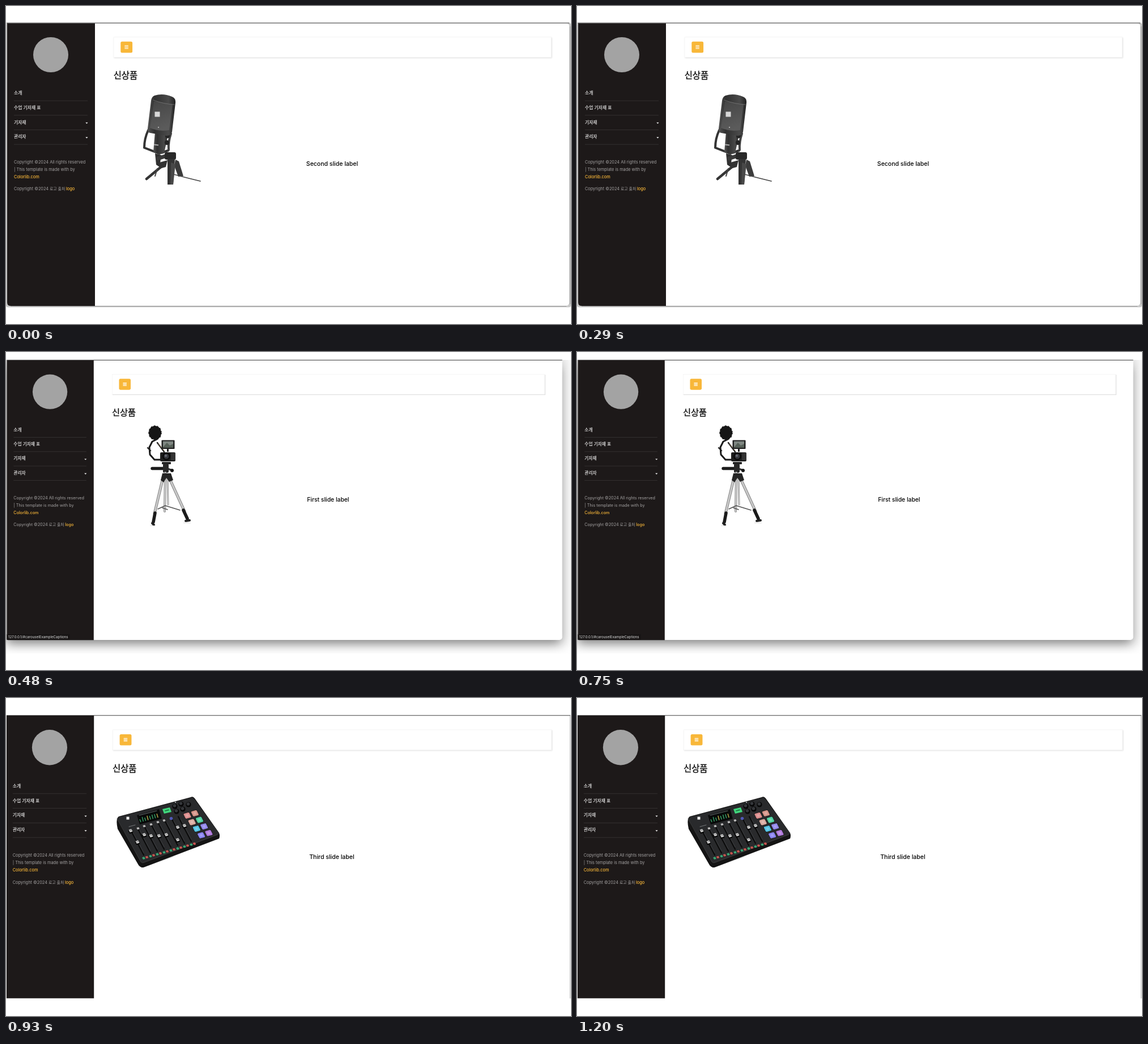
An HTML page for the animation above (1.38 s loop, 997 by 561 pixels).

```html
<!DOCTYPE html>
<html lang="ko">
<head>
<meta charset="utf-8">
<title>Product carousel</title>
<style>
  html, body { margin: 0; width: 100%; height: 100%; overflow: hidden; background: #fff; }
  svg { display: block; width: 997px; height: 561px; }
  text { font-family: Inter, "Noto Sans CJK KR", "Noto Sans CJK", sans-serif; }
  .ko { font-family: "Noto Sans CJK KR", "Noto Sans CJK", sans-serif; }
  .menu { font-size: 7.8px; fill: #f4f4f4; stroke: #f4f4f4; stroke-width: .15; }
  .note { font-size: 7.35px; fill: #a3a1a1; }
  .note .ko { font-size: 6.9px; }
  .note .link { fill: #f8b739; font-weight: 500; }
  .title { font-size: 15.4px; fill: #111; stroke: #111; stroke-width: .35; }
  .caption { font-size: 10.5px; font-weight: 500; fill: #000; text-anchor: middle; }
  .status { font-size: 6.2px; fill: #ddd; }
  .bar { fill: #fff; stroke: #f3f3f3; stroke-width: .7; filter: drop-shadow(1px 1px .8px rgba(0,0,0,.13)); }
</style>
</head>
<body>
<svg id="stage" viewBox="0 0 997 561">
  <defs>
    <filter id="soft" x="-10%" y="-10%" width="120%" height="125%"><feGaussianBlur stdDeviation="9"/></filter>
    <clipPath id="shot"><rect y="14" width="997" height="518"/></clipPath>
    <linearGradient id="metal">
      <stop offset="0" stop-color="#555"/><stop offset=".25" stop-color="#303030"/>
      <stop offset=".75" stop-color="#4a4a4a"/><stop offset="1" stop-color="#222"/>
    </linearGradient>
    <linearGradient id="grille" x2=".3" y2="1">
      <stop offset="0" stop-color="#454545"/><stop offset="1" stop-color="#5b5b5b"/>
    </linearGradient>
  </defs>
</svg>
<script>
const LOOP = 1380;
const SIDE = '#1d1919';

const path = (d, fill, extra = '') => `<path d="${d}" fill="${fill}" ${extra}/>`;
const line = (d, color, width, cap = 'round') =>
  `<path d="${d}" fill="none" stroke="${color}" stroke-width="${width}" stroke-linecap="${cap}" stroke-linejoin="round"/>`;
const rect = (x, y, w, h, fill, r = 0, extra = '') =>
  `<rect x="${x}" y="${y}" width="${w}" height="${h}" rx="${r}" fill="${fill}" ${extra}/>`;
const dot = (x, y, r, fill) => `<circle cx="${x}" cy="${y}" r="${r}" fill="${fill}"/>`;
const label = (x, y, cls, body) => `<text x="${x}" y="${y}" class="${cls}">${body}</text>`;

const sidebar = (x, y, right, bottom, r) =>
  path(`M${x} ${y}H${right}V${bottom}H${x + r}Q${x} ${bottom} ${x} ${bottom - r}Z`, SIDE);

function page(caption) {
  const items = ['소개', '수업 기자재 표', '기자재', '관리자'].map((name, i) => {
    const y = 156.3 + i * 25.65;
    const caret = i > 1 ? path(`M140.3 ${y - 2}h4.2l-2.1 2.2z`, '#fff') : '';
    return label(14, y, 'menu ko', name) + caret +
      rect(14, y + 10.4, 130, .9, 'rgba(255,255,255,.11)');
  }).join('');
  const bars = [69.6, 71.9, 74.2].map(y => rect(209.3, y, 6.6, 1.2, '#fff', .3)).join('');
  return dot(79, 86, 31, '#a3a3a3') + items +
    label(14, 277.6, 'note', 'Copyright ©2024 All rights reserved') +
    label(14, 290.7, 'note', '| This template is made with by') +
    label(14, 304, 'note', '<tspan class="link">Colorlib.com</tspan>') +
    label(14, 325.2, 'note', 'Copyright ©2024 <tspan class="ko" x="77">로고 출처</tspan>' +
      ' <tspan class="link" x="106">logo</tspan>') +
    rect(190, 55, 772, 35.5, '#fff', 0, 'class="bar"') +
    rect(202.3, 62.8, 20.8, 19.6, '#f8b739', 2.5) + bars +
    label(189.7, 128.2, 'title ko', '신상품') +
    label(575.5, 281.8, 'caption', caption);
}

function microphone() {
  return line('M251 219Q244 234 244 250L270 260L286 255', '#333', 4) +
    path('M263 222L286 226L279 260Q270 262 260 257Z', 'url(#metal)') +
    rect(261, 244, 8, 2, '#aaa', 0, 'transform="rotate(8 265 245)"') +
    line('M291 225Q286 240 287 254', '#444', 4) +
    dot(285, 229, 4.2, '#252525') + dot(284, 241, 4.2, '#252525') +
    path('M262 158Q277 153 293 160Q300 163 299 171L293 222Q291 229 283 229L255 224Q249 223 250 216L256 167Q257 160 262 158Z', 'url(#metal)') +
    path('M261 168L294 173L288 219Q270 222 254 215Z', 'url(#grille)') +
    line('M260 166Q278 173 297 174', '#777', .8) +
    rect(262.5, 186.5, 9, 9, '#d8d8d8') + dot(269, 214, 1, '#ccc') +
    path('M263 260L274 263L271 284L265 280Z', '#303030') +
    line('M268 269L284 264', '#3a3a3a', 7) +
    rect(280, 258, 20, 13, '#292929', 3) +
    line('M277 281L248 305', '#353535', 4.5) +
    path('M271 276L285 272L282 284L271 287Z', '#333') +
    path('M299 271L305 274L313 300L304 301L297 282Z', '#3b3b3b') +
    path('M285 270H298L295 315H285Z', '#333') +
    path('M291 276L299 279L295 315H290Z', '#484848') +
    line('M296 297Q314 302 343 309', '#444', 1.6) +
    line('M267 287L263 300', '#444', 2);
}

function cameraRig() {
  // Fluffy windshield: a circle with a wavering radius.
  const fur = Array.from({ length: 60 }, (_, i) => {
    const a = i * Math.PI / 30, r = 11.4 + Math.sin(i * 2.4) * Math.sin(i * 1.1 + 1);
    return `${(263 + r * Math.cos(a)).toFixed(1)} ${(142.5 + r * 1.1 * Math.sin(a)).toFixed(1)}`;
  }).join('L');
  const leg = (x1, y1, x2, y2, w) => line(`M${x1} ${y1}L${x2} ${y2}`, '#858585', w) +
    line(`M${x1} ${y1}L${x2} ${y2}`, '#cacaca', w * .6);
  return path(`M${fur}Z`, '#161616') +
    line('M266 154L258 158L253 168L254 181L262 190H274', '#1b1b1b', 3) +
    line('M250 169L255 174M267 160L279 176', '#222', 2.4) +
    line('M269 162L279 174', '#a58a62', .9) +
    rect(274.5, 155.5, 23, 15.5, '#202020', 1) + rect(277, 157.5, 18, 11, '#7f8782') +
    path('M277 168L284 160L289 165L295 162V168.5H277Z', '#566057') +
    rect(284, 170, 3, 6, '#222') +
    rect(272, 177, 27, 16, '#1d1d1d', 2) + rect(291, 178, 8, 13, '#333', 1) +
    dot(283, 184, 7, '#090909') + dot(283, 184, 4.5, '#35373c') + dot(282, 183, 2, '#686b74') +
    rect(275, 194, 16, 4, '#222', 1) +
    line('M258 205.5H280', '#1c1c1c', 5.4) + line('M280 204L294 209', '#333', 3.4) +
    rect(277, 197, 10, 16, '#282828', 2) + dot(293, 209, 3, '#151515') +
    leg(281, 213, 280, 281, 4) + leg(277, 222, 262, 285, 5) + leg(288, 222, 315, 281, 5) +
    leg(285, 220, 286, 269, 3) +
    path('M276 214H291L295 226L288 229L283 222L278 230L273 226Z', '#242424') +
    line('M268 277L281 271L307 279M276 275L285 278', '#555', 1.5) +
    line('M263 284L260 300M313 279L320 294', '#1b1b1b', 5.6) +
    line('M258 302L261 305M317 298L324 297', '#222', 4) +
    rect(254, 306, 9, 1, '#ddd') + rect(313, 301, 13, 1, '#ddd');
}

function mixer() {
  const key = (x, y, s, fill) =>
    rect(-s / 2, -s / 2, s, s, fill, s / 6, `transform="matrix(.95 -.27 .42 .84 ${x} ${y})"`);
  const cap = (x, y) => key(x, y + 1.5, 7, '#050505') + key(x, y, 5.2, '#d4d4d4') + line(`M${x - 2} ${y}l4 -1`, '#666', .8);

  let out = path('M199 209L326 175Q330 173 333 177L376 238Q378 243 376 248L245 298Q239 301 234 295L197 231Q193 213 199 209Z', '#141414') +
    path('M199 210L327 176Q330 175 332 178L375 237Q377 240 372 242L244 290Q240 292 237 288L197 214Z', '#292a2c') +
    line('M196 213L238 289Q240 292 244 290L373 241', '#454545', .8) +
    line('M239 299L295 280', 'rgba(0,0,0,.12)', 1.5);

  for (let i = 0; i < 8; i++) {
    const x = 220 + i * 12, y = 233 - i * 3.4;
    out += line(`M${x} ${y}L${x + 23} ${y + 44}`, '#0b0b0b', 2.2) +
      line(`M${x + 4} ${y + 4}L${x + 23} ${y + 40}`, '#55575a', .5) +
      key(x + 23, y + 49.5, 4.2, '#38a875') + key(x + 28.5, y + 47.8, 4.2, '#c8554f');
  }
  [[220, 234], [232, 254], [244, 241], [256, 243], [270, 243], [283, 241], [303, 228], [315, 225], [303, 250]]
    .forEach(p => out += cap(...p));
  [[233, 230], [244, 226], [256, 223], [268, 219], [279, 216]].forEach(p => out += key(...p, 4, '#bbb'));

  out += path('M231 207L270 196L275 213L236 223Z', '#080909');
  for (let i = 0; i < 8; i++) {
    const x = 238 + i * 4.3, y = 219 - i * 1.15, h = 5 + 3 * Math.abs(Math.sin(i * 1.7));
    out += line(`M${x} ${y}l-2 ${-h}`, i % 4 === 3 ? '#b5a647' : '#359f66', 1.5, 'butt');
  }
  out += line('M235 207L266 199', '#8c9297', .7) +
    path('M276 196L289 193L292 201L279 204Z', '#41d77d') + line('M281 199L287 197.5', '#176536', 1.5);
  [[298, 191], [309, 187], [322, 188], [301, 200], [312, 196]].forEach(([x, y]) =>
    out += dot(x, y, 4.6, '#060606') + dot(x - .5, y - 1, 2.8, '#34363a'));
  out += dot(299, 184, 1, '#ccc') + dot(291.5, 212.5, 2.8, '#5058b5');

  const pads = ['#dc8d8d', '#d59488', '#d9aaa0', '#50d2a2', '#54c4e5', '#9388ec', '#8b84f2', '#b17bdc'];
  pads.forEach((color, i) => {
    const row = i >> 1, x = 320 + row * 8.2 + (i % 2) * 13.3, y = 207.4 + row * 11.6 - (i % 2) * 4;
    out += key(x, y, 11.8, '#151515') + key(x, y, 10.6, color) + key(x, y, 5, 'rgba(255,255,255,.2)');
  });
  return out + line('M217 227L228 224', '#77797c', 1) + rect(212.5, 209.5, 5, 5, '#eee');
}

const scenes = [
  { start: 0, caption: 'Second slide label', place: [1, 1, 0, 0], photo: microphone,
    back: rect(0, 29.5, 997, 502, '#c9c9c9', 4) + rect(2, 30, 992, 499, '#fff', 6) +
      rect(994.8, 36, 1, 490, '#9b9b9b') + rect(8, 529, 981, 1, '#8d8d8d') +
      rect(1, 29.3, 993, 1.5, '#777') + sidebar(2, 30.5, 157, 529, 6) },
  { start: 480, caption: 'First slide label', place: [.9885, .9885, -.5, -14.8], photo: cameraRig,
    back: `<g clip-path="url(#shot)">${rect(-10, 0, 1002, 520, 'rgba(0,0,0,.1)', 10, 'filter="url(#soft)"')}` +
      `${rect(2, 24, 976, 490, 'rgba(0,0,0,.42)', 8, 'filter="url(#soft)"')}</g>` +
      rect(1.5, 9, 980, 499, '#fff', 5) + rect(0, 0, 997, 14, '#fff') +
      rect(1.5, 13.8, 980, 1, '#333') + sidebar(1.5, 14.5, 154.8, 508.2, 2),
    front: rect(1.5, 498, 111, 10, '#171414') + label(4, 505.2, 'status', '127.0.0.1/#carouselExampleCaptions') },
  { start: 930, caption: 'Third slide label', place: [1.003, 1.005, -2.3, .8], photo: mixer,
    back: rect(1, 30, 995, 1.4, '#777') + rect(995, 31, 1, 499, '#aaa') + sidebar(1, 31, 155.2, 529.7, 0) }
];

const stage = document.getElementById('stage');
scenes.forEach(({ caption, place: [sx, sy, x, y], back, photo, front = '' }, index) => {
  const group = document.createElementNS('http://www.w3.org/2000/svg', 'g');
  group.innerHTML = `${back}<g transform="matrix(${sx} 0 0 ${sy} ${x} ${y})">${page(caption)}</g>${photo()}${front}`;
  stage.append(group);
  // One hard step per scene; the last step holds until the loop ends.
  const steps = scenes.map(({ start }, i) =>
    ({ offset: start / LOOP, opacity: i === index ? 1 : 0, easing: 'step-end' }));
  steps.push({ ...steps.at(-1), offset: 1 });
  group.animate(steps, { duration: LOOP, iterations: Infinity }).startTime = 0;
});
</script>
</body>
</html>
```
